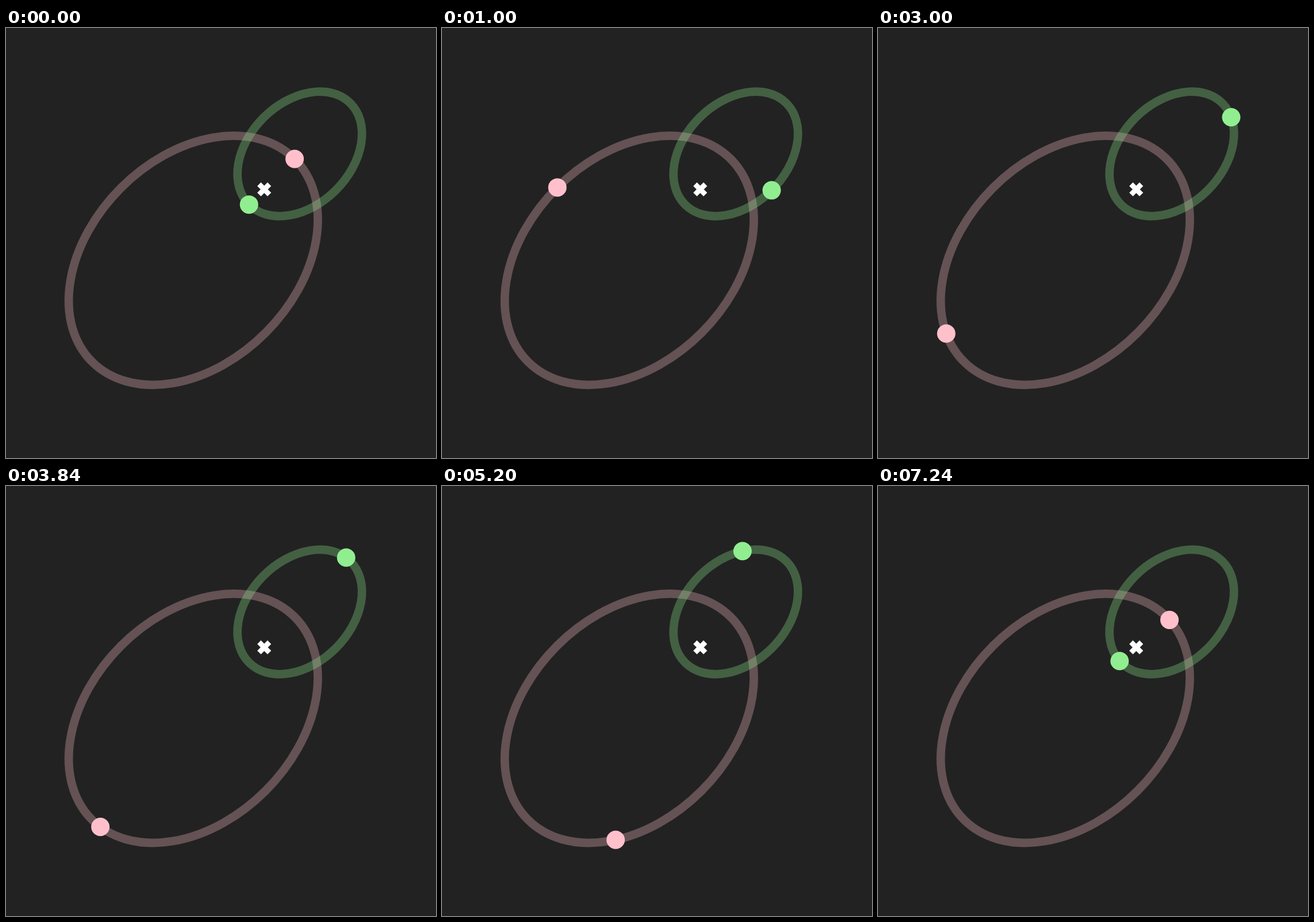
An HTML page with a canvas for the animation above (7.28 s loop, 748 by 748 pixels).

```html
<!DOCTYPE html>
<html lang="en">
<head>
<meta charset="utf-8">
<title>Two-body orbit</title>
<style>
html, body { margin: 0; width: 100%; height: 100%; overflow: hidden; background: #222; }
canvas { display: block; }
</style>
</head>
<body>
<canvas id="stage" width="748" height="748"></canvas>
<script>
const ctx = document.getElementById('stage').getContext('2d');
const LOOP = 7280, STEP = 40, PERIOD = 7254;
const ECC = 0.7, FLAT = Math.sqrt(1 - ECC * ECC);
const FOCUS = { x: 449.2, y: 280.7 };
const RING = 14.7, DOT = 16;

// semi-major axis; a negative one puts the orbit on the opposite side
const bodies = [
  { axis: 748 / 3, color: 'pink' },
  { axis: -748 / 6, color: 'lightgreen' }
];

// Kepler's equation by Newton iteration
function anomaly(mean) {
  let e = mean + ECC * Math.sin(mean);
  for (let i = 0; i < 12; i++) {
    e -= (e - ECC * Math.sin(e) - mean) / (1 - ECC * Math.cos(e));
  }
  return e;
}

function drawRing({ axis, color }) {
  const a = Math.abs(axis);
  ctx.globalAlpha = 0.3;
  ctx.strokeStyle = color;
  ctx.lineWidth = RING;
  ctx.beginPath();
  ctx.ellipse(-axis * ECC, 0, a, a * FLAT, 0, 0, 2 * Math.PI);
  ctx.stroke();
  ctx.globalAlpha = 1;
}

function drawDot({ axis, color }, e) {
  ctx.fillStyle = color;
  ctx.beginPath();
  ctx.arc(axis * (Math.cos(e) - ECC), -axis * FLAT * Math.sin(e), DOT, 0, 2 * Math.PI);
  ctx.fill();
}

function drawCross() {
  const arm = 12.6, half = 4.5;
  ctx.fillStyle = '#fff';
  ctx.beginPath();
  ctx.rect(-arm, -half, 2 * arm, 2 * half);
  ctx.rect(-half, -arm, 2 * half, 2 * arm);
  ctx.fill();
}

function draw(ms) {
  const t = Math.floor((ms % LOOP) / STEP) * STEP;
  const e = anomaly(2 * Math.PI * (t % PERIOD) / PERIOD);
  ctx.fillStyle = '#222';
  ctx.fillRect(0, 0, 748, 748);
  ctx.save();
  ctx.translate(FOCUS.x, FOCUS.y);
  ctx.rotate(-Math.PI / 4);
  bodies.forEach(drawRing);
  drawCross();
  bodies.forEach(b => drawDot(b, e));
  ctx.restore();
}

const start = performance.now();
function tick() {
  draw(performance.now() - start);
  requestAnimationFrame(tick);
}
tick();
</script>
</body>
</html>
```
